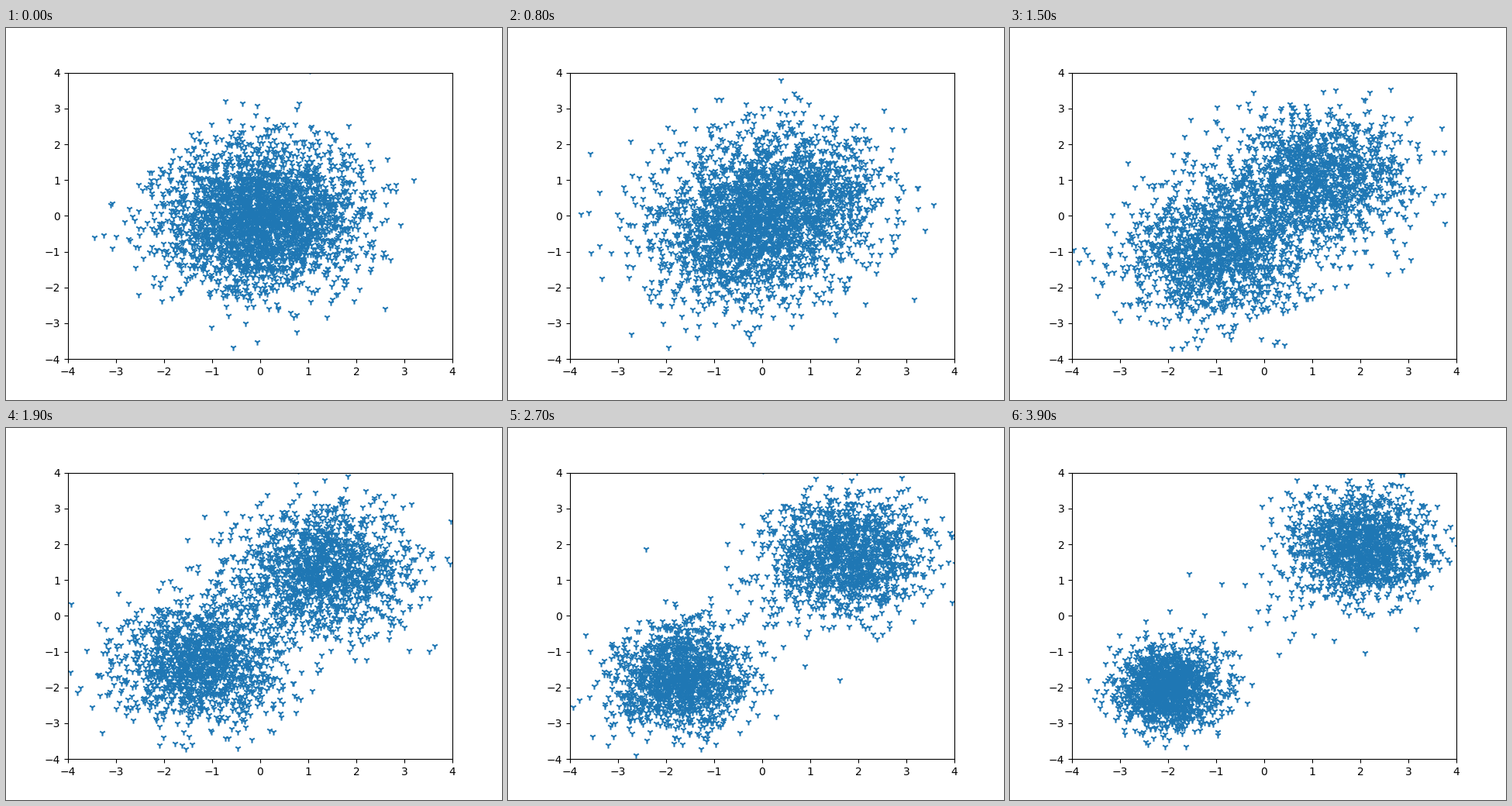
A matplotlib script for the animation above (4000 ms loop, 640x480 px).

```python
import matplotlib.pyplot as plt
import numpy as np
from matplotlib.animation import FuncAnimation

POINTS = 3000
FRAMES = 40
INTERVAL = 100

# Gaussian mixture the noise turns into: two clusters and a few strays between
WEIGHTS = np.array([0.496, 0.496, 0.008])
CENTERS = np.array([[2.0, 1.95], [-2.0, -2.03], [0.0, 0.0]])
SPREADS = np.array([0.71, 0.54, 0.85])

rng = np.random.default_rng(7)


def schedule(frame):
    """Signal level and noise variance, a cosine schedule with a slow start."""
    angle = 0.5 * np.pi * (frame / (FRAMES - 1)) ** 1.1
    return np.sin(angle), np.cos(angle) ** 2


def sample_clean(x, signal, noise_var):
    """Draw clean points from their posterior given the noisy points x."""
    var = signal**2 * SPREADS**2 + noise_var
    gap = x[:, None, :] - signal * CENTERS
    log_p = np.log(WEIGHTS / var) - (gap**2).sum(axis=2) / (2 * var)
    p = np.exp(log_p - log_p.max(axis=1, keepdims=True))
    p /= p.sum(axis=1, keepdims=True)
    pick = (rng.random((len(x), 1)) > p.cumsum(axis=1)[:, :-1]).sum(axis=1)

    gain = signal * SPREADS[pick] ** 2 / var[pick]
    std = SPREADS[pick] * np.sqrt(noise_var / var[pick])
    offset = x - signal * CENTERS[pick]
    noise = rng.standard_normal(x.shape)
    return CENTERS[pick] + gain[:, None] * offset + std[:, None] * noise


def denoise(x, frame):
    """One reverse diffusion step from the given frame to the next."""
    signal, var = schedule(frame)
    next_signal, next_var = schedule(frame + 1)
    ratio = signal / next_signal
    step_var = var - ratio**2 * next_var
    clean = sample_clean(x, signal, var)
    mean = (ratio * next_var * x + next_signal * step_var * clean) / var
    std = np.sqrt(step_var * next_var / var)
    return mean + std * rng.standard_normal(x.shape)


states = [rng.standard_normal((POINTS, 2))]
for k in range(FRAMES - 1):
    states.append(denoise(states[-1], k))

fig, ax = plt.subplots(figsize=(6.4, 4.8), dpi=100)
ax.set_xlim(-4, 4)
ax.set_ylim(-4, 4)
cloud = ax.scatter(states[0][:, 0], states[0][:, 1], marker="1", color="C0")


def update(frame):
    cloud.set_offsets(states[frame])
    return (cloud,)


anim = FuncAnimation(fig, update, frames=FRAMES, interval=INTERVAL, repeat=True)
plt.show()
```
